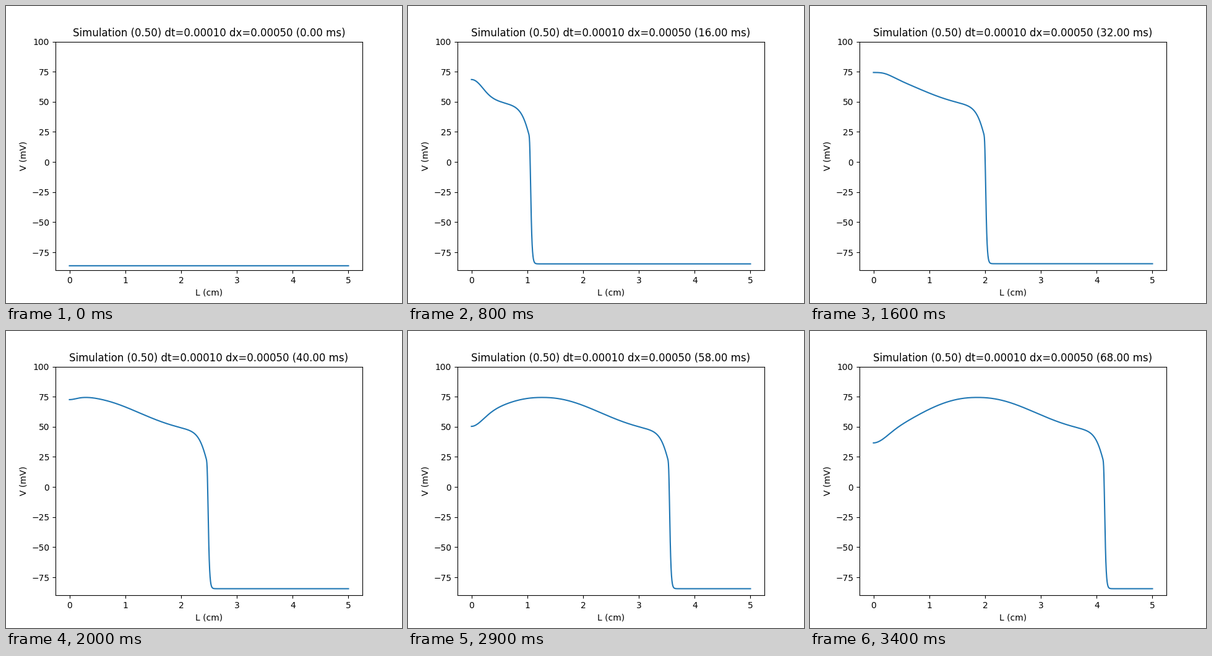
Recreate the animation shown at these times as a matplotlib script. Size 640 px wide and 480 px high, loop 3500 ms.

```python
import numpy as np
import matplotlib.pyplot as plt
from matplotlib.animation import FuncAnimation

FRAMES, INTERVAL, STEP_MS = 35, 100, 2.0
SPEED, START = 0.0592, 0.118   # front speed (cm/ms) and offset (cm)
REST, REST0 = -84.5, -86.2     # settled and initial potential (mV)
PEAK, PEAK_AT = 74.4, 2.28     # crest height and its distance behind the front


def bump_drop(u, depth, width):
    return depth * (1 - np.exp(-(np.abs(u) / width) ** 2.2))


def pulse(d):
    """Potential at distance d behind the front."""
    back = np.maximum(d, 0)
    u = back - PEAK_AT
    drop = np.where(u < 0, bump_drop(u, 30, 1.375), bump_drop(u, 50, 1.71))
    shoulder = 27 * np.exp(-(back / 0.125) ** 1.24)
    upstroke = 1 - np.exp(-np.exp(np.minimum(d / 0.0155 + 0.1, 5)))
    return REST + (PEAK - drop - shoulder - REST) * upstroke


def potential(x, t):
    if t == 0:
        return np.full_like(x, REST0)
    # the stimulated end runs ahead of the travelling wave
    lead = 0.25 + 1.7 * np.exp(-t / 11)
    reach = 0.3 * (1 - np.exp(-t / 5.5))
    behind = START + SPEED * t - np.hypot(x, 0.12) + lead * np.exp(-(x / reach) ** 2)
    v = pulse(behind)
    sag = (REST0 - REST) * np.exp(-t / 6.3)
    return v + sag * (1 - np.clip((v - REST) / 100, 0, 1))


x = np.linspace(0, 5, 2001)
fig, ax = plt.subplots(figsize=(6.4, 4.8), dpi=100)
line, = ax.plot(x, potential(x, 0))
ax.set_xlim(-0.25, 5.25)
ax.set_ylim(-90, 100)
ax.set_xlabel("L (cm)")
ax.set_ylabel("V (mV)")
title = ax.set_title("")


def update(frame):
    t = frame * STEP_MS
    line.set_ydata(potential(x, t))
    title.set_text(f"Simulation (0.50) dt=0.00010 dx=0.00050 ({t:.2f} ms)")
    return line, title


anim = FuncAnimation(fig, update, frames=FRAMES, interval=INTERVAL,
                     repeat=True, repeat_delay=0)
plt.show()
```
